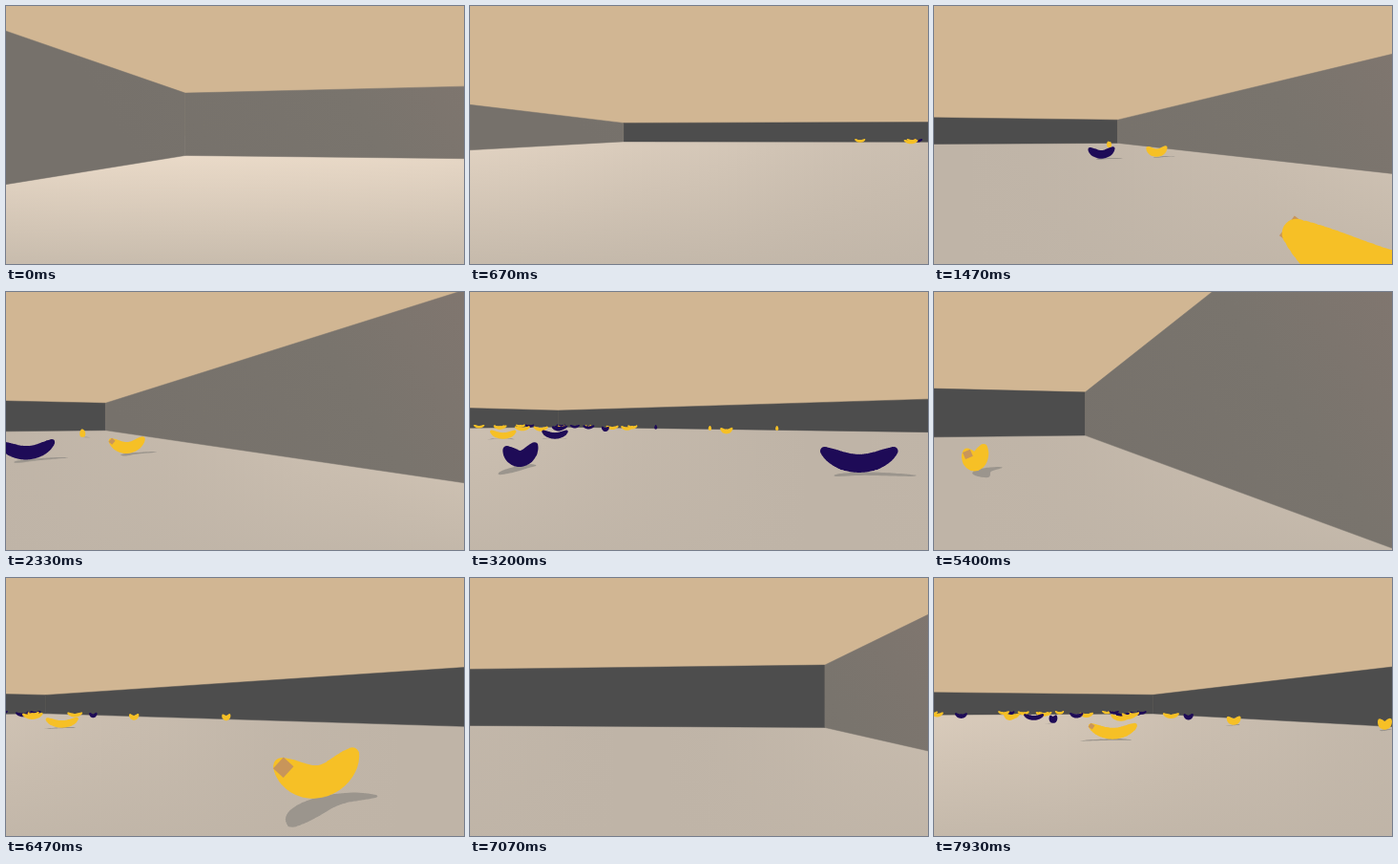
An HTML page with a canvas that plays this animation: 480x270 px, repeating every 8 s.

```html
<!DOCTYPE html>
<html lang="en">
<head>
<meta charset="utf-8">
<title>Banana room</title>
<style>
html, body { margin: 0; width: 100%; height: 100%; overflow: hidden; background: #d1b693; }
canvas { display: block; width: 480px; height: 270px; }
</style>
</head>
<body>
<canvas id="view" width="480" height="270"></canvas>
<script>
const ctx = document.getElementById('view').getContext('2d');
const W = 480, H = 270, CX = 240, HORIZON = 135.7;
const FOCAL = 385, ROOM = 34.2, WALL = 3.15;        // eye height is 1
const LOOP = 8000, STEP = 1000 / 15;
const RAD = Math.PI / 180;
const SUN = [0.8, -0.6];                            // shadow shift per unit of height
const REACH = 1.2;                                  // bananas closer than this are picked up
const YELLOW = '#f6c026', PURPLE = '#1e0b57', STEM = '#c8955a';

// Walk of the camera: time, x, y, heading in degrees clockwise from +y
const PATH = [
  [0, 28.1, -16.5, 168.7],
  [1470, 25.6, -15.5, 377.3],
  [1730, 27.2, -14.2, 395],
  [2000, 27.5, -12, 412],
  [3200, 29.4, -7.1, 324],
  [4200, 27.4, -2.1, 407],
  [4730, 30, 1, 400],
  [5400, 31.6, 6.9, 377.4],
  [6130, 32.3, 9.6, 358],
  [6470, 32.35, 11.6, 316],
  [6980, 30.3, 14.8, 357],
  [7930, 25, 16.7, 288]
];

function slope(i, c) {
  if (i === PATH.length - 1) return 0;
  const a = PATH[Math.max(i - 1, 0)], b = PATH[i + 1];
  return (b[c] - a[c]) / (b[0] - a[0]);
}

function along(t, c) {
  let i = 0;
  while (i < PATH.length - 2 && t >= PATH[i + 1][0]) i++;
  const a = PATH[i], b = PATH[i + 1], d = b[0] - a[0], u = Math.min((t - a[0]) / d, 1);
  const u2 = u * u, u3 = u2 * u;
  return a[c] * (2 * u3 - 3 * u2 + 1) + b[c] * (3 * u2 - 2 * u3)
    + d * slope(i, c) * (u3 - 2 * u2 + u) + d * slope(i + 1, c) * (u3 - u2);
}

function cameraAt(t) {
  const deg = along(t, 3), s = Math.sin(deg * RAD), c = Math.cos(deg * RAD);
  return { x: along(t, 1), y: along(t, 2), deg, fwd: [s, c], right: [c, -s] };
}

function toCamera(cam, x, y) {
  const dx = x - cam.x, dy = y - cam.y;
  return [dx * cam.right[0] + dy * cam.right[1], dx * cam.fwd[0] + dy * cam.fwd[1]];
}

const project = (x, z, h) => [CX + FOCAL * x / z, HORIZON + FOCAL * (1 - h) / z];

const bananas = [];
function addBanana(color, x, y, deg) {
  bananas.push({ color, x, y, ax: Math.sin(deg * RAD), ay: Math.cos(deg * RAD), picked: pickTime(x, y) });
}

function pickTime(x, y) {
  for (let t = 0; t < LOOP; t += STEP) {
    if (Math.hypot(along(t, 1) - x, along(t, 2) - y) < REACH) return t;
  }
  return Infinity;
}

// Bananas near the walk: x, y, heading from stem to tip
[[27.5, -14.1, 132], [30.4, 1.3, 54], [30.2, 15.2, 3], [13.4, 18.8, 8], [12.2, 31.5, -24],
  [6, 27.2, -33], [7.6, 3.5, 54], [-2.1, 22.2, 18]].forEach(b => addBanana(YELLOW, ...b));
[[27.7, 0.6, 54], [21.4, -2.8, -38], [10, 5.3, 54], [0, 17.3, -75],
  [-3, 28, -40]].forEach(b => addBanana(PURPLE, ...b));

// The far side is strewn at random
let seed = 11;
const random = () => (seed = seed * 16807 % 2147483647) / 2147483647;
for (let i = 0; i < 22; i++) {
  addBanana(i % 3 ? YELLOW : PURPLE, -6 - 27 * random(), 3 + 29 * random(), 20 + 90 * (random() - 0.5));
}

const spineHeight = s => 0.18 + 0.24 * s * s;
const spineRadius = s => 0.18 * (1 - 0.52 * s * s * s * s);

function spine(cam, b, s) {
  const [x, z] = toCamera(cam, b.x + b.ax * 0.68 * s, b.y + b.ay * 0.68 * s);
  return { x, z, h: spineHeight(s) };
}

function ovals(dots) {
  ctx.beginPath();
  for (const [x, y, rx, ry] of dots) {
    ctx.moveTo(x + rx, y);
    ctx.ellipse(x, y, rx, ry, 0, 0, 2 * Math.PI);
  }
  ctx.fill();
}

function drawShadow(cam, b) {
  const dots = [];
  for (let s = -1.1; s <= 1.01; s += 0.06) {
    const h = spineHeight(s), k = 0.68 * s;
    const [x, z] = toCamera(cam, b.x + b.ax * k + SUN[0] * h, b.y + b.ay * k + SUN[1] * h);
    if (z < 0.4) continue;
    const r = spineRadius(s) * FOCAL / z;
    dots.push([...project(x, z, 0), r, r / z * 1.15]);
  }
  ctx.fillStyle = '#9b958d';
  ovals(dots);
}

function drawStem(cam, b) {
  const p = spine(cam, b, -0.9), q = spine(cam, b, -1.08);
  if (p.z < 0.4 || q.z < 0.4) return;
  const [x1, y1] = project(p.x, p.z, p.h), [x2, y2] = project(q.x, q.z, q.h);
  const w = 0.15 * FOCAL / q.z;
  // a stem seen end-on still shows its blunt face
  const dx = x2 - x1, dy = y2 - y1, k = Math.max(1, w * 0.9 / (Math.hypot(dx, dy) || 1));
  ctx.strokeStyle = STEM;
  ctx.lineWidth = w;
  ctx.beginPath();
  ctx.moveTo(x2 - dx * k, y2 - dy * k);
  ctx.lineTo(x2, y2);
  ctx.stroke();
}

function drawBanana(cam, b) {
  const dots = [];
  for (let s = -1; s <= 1.01; s += 0.05) {
    const p = spine(cam, b, s);
    if (p.z < 0.4) continue;
    const r = spineRadius(s) * FOCAL / p.z;
    dots.push([...project(p.x, p.z, p.h), r, r]);
  }
  const stemInFront = spine(cam, b, -1).z < spine(cam, b, 1).z;
  const hasStem = b.color === YELLOW && b.z < 14;
  if (hasStem && !stemInFront) drawStem(cam, b);
  ctx.fillStyle = b.color;
  ovals(dots);
  if (hasStem && stemInFront) drawStem(cam, b);
}

// The floor glows towards the light.
function drawFloor(cam) {
  ctx.fillStyle = '#bfb4a7';
  ctx.fillRect(0, HORIZON, W, H - HORIZON);
  const step = 10;
  for (let x = 0; x < W; x += step) {
    const a = cam.deg * RAD + Math.atan((x + step / 2 - CX) / FOCAL);
    const glow = Math.pow(0.5 + 0.5 * Math.cos(a - 165 * RAD), 0.8);
    const g = ctx.createLinearGradient(0, 148, 0, H);
    g.addColorStop(0, `rgba(236,220,202,${glow})`);
    g.addColorStop(1, `rgba(200,188,173,${glow})`);
    ctx.fillStyle = g;
    ctx.fillRect(x, HORIZON, step, H - HORIZON);
  }
}

function wallPaint(lit) {
  if (!lit) return '#4d4d4d';
  const g = ctx.createLinearGradient(160, 200, 480, 0);
  g.addColorStop(0, '#76716b');
  g.addColorStop(0.6, '#79746d');
  g.addColorStop(1, '#80766f');
  return g;
}

function drawWall(cam, from, to, lit) {
  let a = toCamera(cam, ...from), b = toCamera(cam, ...to);
  const near = 0.05;
  if (a[1] < near && b[1] < near) return;
  const clip = (p, q) => {
    if (p[1] >= near) return p;
    const u = (near - p[1]) / (q[1] - p[1]);
    return [p[0] + (q[0] - p[0]) * u, near];
  };
  [a, b] = [clip(a, b), clip(b, a)];
  ctx.beginPath();
  ctx.moveTo(...project(...a, WALL));
  ctx.lineTo(...project(...b, WALL));
  ctx.lineTo(...project(...b, 0));
  ctx.lineTo(...project(...a, 0));
  ctx.closePath();
  ctx.fillStyle = ctx.strokeStyle = wallPaint(lit);
  ctx.lineWidth = 0.5;
  ctx.fill();
  ctx.stroke();
}

function draw(t) {
  const cam = cameraAt(t), R = ROOM;
  ctx.fillStyle = '#d1b693';
  ctx.fillRect(0, 0, W, H);
  drawFloor(cam);
  drawWall(cam, [-R, R], [R, R], false);
  drawWall(cam, [-R, -R], [-R, R], false);
  drawWall(cam, [R, R], [R, -R], true);
  drawWall(cam, [R, -R], [-R, -R], true);

  const shown = bananas.filter(b => {
    b.z = toCamera(cam, b.x, b.y)[1];
    return t < b.picked && b.z > 0.3;
  }).sort((p, q) => q.z - p.z);
  for (const b of shown) if (b.z < 25) drawShadow(cam, b);
  for (const b of shown) drawBanana(cam, b);
}

function tick(now) {
  const t = now % LOOP;
  draw(Math.floor(t / STEP + 0.1) * STEP % LOOP);
  requestAnimationFrame(tick);
}
requestAnimationFrame(tick);
</script>
</body>
</html>
```
